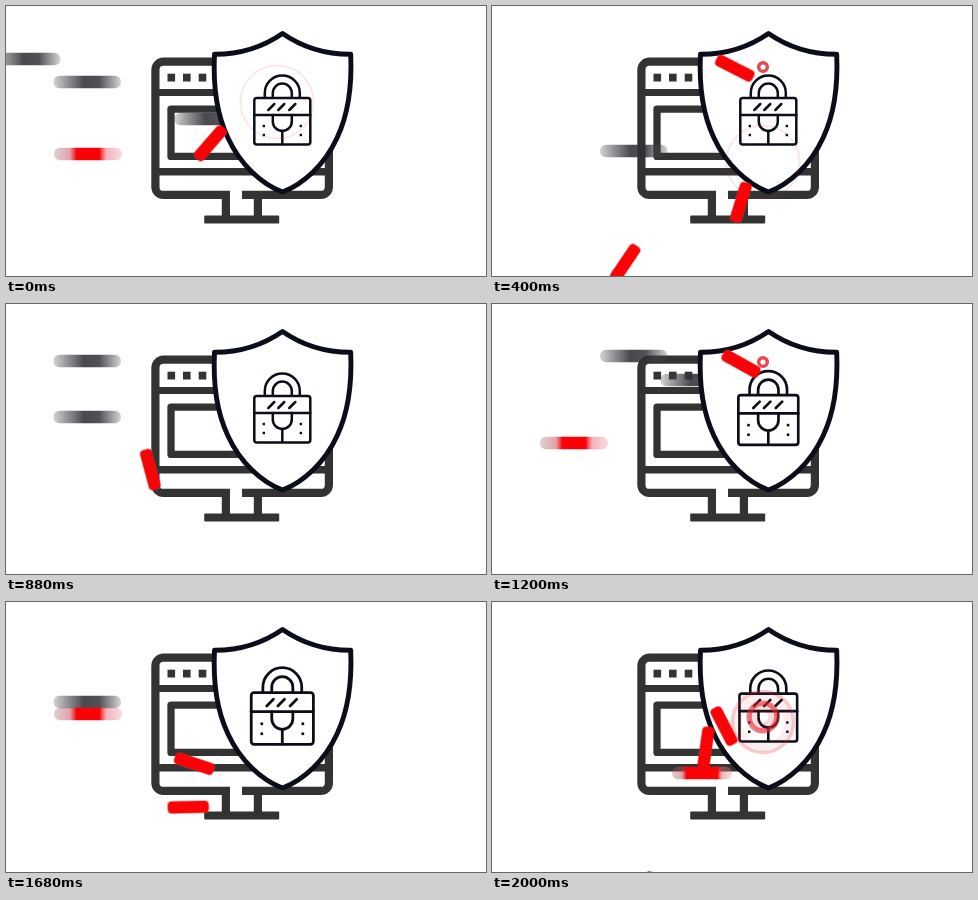
Write an HTML page with a canvas that moves like this. It is 480 by 270 pixels and loops after 2040 ms.

```html
<!DOCTYPE html>
<html lang="en">
<head>
<meta charset="utf-8">
<title>Shielded computer</title>
<style>
html, body { margin: 0; width: 100%; height: 100%; overflow: hidden; background: #fff; }
canvas { display: block; width: 480px; height: 270px; }
</style>
</head>
<body>
<canvas id="stage" width="480" height="270"></canvas>
<script>
const ctx = document.getElementById('stage').getContext('2d');
const STEP = 40, STEPS = 51;
const GREY = '#333334', INK = '#0b0e19', RED = '#fa0306';

// Grey beams: [step of entry, height]
const beams = [
  [-3, 113], [-1, 76], [0, 53], [4, 100], [8, 145], [13, 76], [17, 130],
  [21, 57], [21, 113], [24, 88], [27, 76], [28, 52], [33, 60],
  [37, 88], [38, 114], [41, 100], [44, 113], [46, 146]
];

// Red attacks: beam height, step of impact, then the path of the tumbling rod
const attacks = [
  { hit: -7, lane: 88,  x: 254, y: 103, vx: -7.1, vy: 2,   turn: 10, spin: 17.3 },
  { hit: 3,  lane: 148, x: 258, y: 155, vx: -1.3, vy: 3,   turn: 7,  spin: 14.3 },
  { hit: 9,  lane: 53,  x: 251, y: 59,  vx: -8.2, vy: 2.8, turn: 8,  spin: 19 },
  { hit: 29, lane: 50,  x: 254, y: 56,  vx: -5.05, vy: 3.45, turn: 15, spin: 14.1, g: 0.72 },
  { hit: 33, lane: 139, x: 252, y: 149, vx: -7.75, vy: 2.5, turn: 7, spin: 19.1 },
  { hit: 45, lane: 112, x: 252, y: 116, vx: -7.6, vy: 3.8, turn: 7,  spin: 18.2, lead: 1 },
  { hit: 47, lane: 107, x: 253, y: 112, vx: -7,   vy: 2.8, turn: 10, spin: 17.6 },
  { hit: 51, lane: 171, x: 254, y: 172, vx: -7,   vy: 3,   turn: 10, spin: 17.6 }
];

function pill(x, y, w, h, r, fill) {
  ctx.beginPath();
  ctx.roundRect(x, y, w, h, r);
  ctx.fillStyle = fill;
  ctx.fill();
}

function box(x, y, w, h, r, width, color) {
  ctx.beginPath();
  ctx.roundRect(x, y, w, h, r);
  ctx.lineWidth = width;
  ctx.strokeStyle = color;
  ctx.stroke();
}

function line(...p) {
  ctx.beginPath();
  for (let i = 0; i < p.length; i += 2) ctx.lineTo(p[i], p[i + 1]);
  ctx.stroke();
}

function circle(x, y, r, width, alpha) {
  ctx.beginPath();
  ctx.arc(x, y, Math.max(1, r), 0, 2 * Math.PI);
  ctx.lineWidth = width;
  ctx.strokeStyle = `rgba(225,35,45,${alpha})`;
  ctx.stroke();
}

function blend(x, w, stops) {
  const g = ctx.createLinearGradient(x, 0, x + w, 0);
  for (const [at, color] of stops) g.addColorStop(at, color);
  return g;
}

function greyBeam(x, y) {
  pill(x, y - 6.3, 67.5, 12.6, 6, blend(x, 67.5, [
    [0, 'rgba(70,70,78,.24)'], [0.2, 'rgba(65,65,72,.56)'],
    [0.45, 'rgba(48,48,53,.88)'], [0.68, 'rgba(48,48,53,.84)'],
    [0.85, 'rgba(65,65,72,.54)'], [1, 'rgba(70,70,78,.22)']
  ]));
}

// edge: share of the width that fades out at either end
function redBeam(x, y, w, edge) {
  pill(x, y - 6.3, w, 12.6, 6, blend(x, w, [
    [0, 'rgba(150,100,110,.3)'], [edge * 0.7, 'rgba(200,70,80,.5)'],
    [edge, RED], [1 - edge, RED],
    [1 - edge * 0.7, 'rgba(235,100,110,.5)'], [1, 'rgba(225,140,155,.3)']
  ]));
}

function monitor() {
  box(149.4, 55.7, 173.5, 133.2, 8, 8.2, GREY);
  ctx.fillStyle = '#fff';
  ctx.fillRect(224, 184, 12, 10);
  ctx.fillStyle = GREY;
  ctx.fillRect(150, 83, 173, 7);
  ctx.fillRect(150, 162, 173, 7.5);
  for (const x of [161.5, 177, 192.7]) ctx.fillRect(x, 67.7, 7.6, 7.8);
  box(165, 103.1, 142, 47.3, 0, 7.3, GREY);
  ctx.fillRect(215.8, 189, 8.2, 22);
  ctx.fillRect(247.8, 189, 8.2, 22);
  pill(198.2, 209.4, 75, 8, 1, GREY);
}

function shield() {
  ctx.beginPath();
  ctx.moveTo(276.5, 27.4);
  ctx.bezierCurveTo(258, 40.2, 235, 48.3, 208.5, 48.2);
  ctx.bezierCurveTo(207, 78, 210, 107, 222, 132);
  ctx.bezierCurveTo(234, 158, 255, 178, 276.5, 186);
  ctx.bezierCurveTo(298, 178, 319, 158, 331, 132);
  ctx.bezierCurveTo(343, 107, 346, 78, 344.7, 48.2);
  ctx.bezierCurveTo(318, 48.3, 295, 40.2, 276.5, 27.4);
  ctx.closePath();
  ctx.fillStyle = '#fff';
  ctx.fill();
  ctx.lineWidth = 4.9;
  ctx.lineJoin = 'round';
  ctx.strokeStyle = INK;
  ctx.stroke();
}

function arch(r) {
  ctx.beginPath();
  ctx.moveTo(-r, -13);
  ctx.lineTo(-r, -17);
  ctx.arc(0, -17, r, Math.PI, 0);
  ctx.lineTo(r, -13);
  ctx.stroke();
}

function lock(scale) {
  ctx.save();
  ctx.translate(276.3, 104);
  ctx.scale(scale, scale);
  box(-28, -12, 56, 46.5, 2.5, 2.5, INK);
  ctx.lineCap = 'round';
  arch(17.5);
  arch(9.5);
  line(-28, 5, 28, 5);
  for (const x of [-14, -4, 7]) line(x, 0, x + 6, -6);
  ctx.beginPath();
  ctx.moveTo(-9.5, 5);
  ctx.lineTo(-9.5, 11.5);
  ctx.arc(0, 11.5, 9.5, Math.PI, 0, true);
  ctx.lineTo(9.5, 5);
  ctx.stroke();
  line(0, 21, 0, 34);
  ctx.fillStyle = INK;
  for (const x of [-18.5, 18.5])
    for (const y of [16, 25]) ctx.fillRect(x - 1.2, y - 1.2, 2.4, 2.4);
  ctx.restore();
}

// Shock ring with a pale inner glow, thinning as it spreads
function ring(lane, age) {
  if (age <= 0 || age >= 8) return;
  const y = lane + 8, r = 5.25 * age;
  const swell = Math.max(0, Math.sin(Math.PI * age / 7));
  const w = 2 + 3.4 * swell;
  if (age > 2) circle(271, y, r - 6, 9, 0.16 * swell);
  circle(271, y, r - w / 2 + 0.8, w, 0.95 - age * 0.12);
}

function rod(a, age) {
  ctx.save();
  ctx.translate(a.x + a.vx * age, a.y + a.vy * age + (a.g || 0.83) * age * age / 2);
  ctx.rotate((a.turn + a.spin * age) * Math.PI / 180);
  pill(-21.3, -6.6, 42.6, 13.2, 4.5, 'rgba(205,50,60,.5)');
  pill(-20.2, -5.8, 40.4, 11.6, 4, RED);
  ctx.restore();
}

function draw(n) {
  ctx.fillStyle = '#fff';
  ctx.fillRect(0, 0, 480, 270);
  monitor();
  for (const [start, y] of beams) {
    const k = n - start;
    if (k >= 0 && k < 5) greyBeam(-13 + 60.5 * k, y);
  }
  shield();
  lock(1 + 0.15 * Math.max(0, 1 - Math.abs(n - 38) / 15));
  for (const a of attacks) {
    const age = n - a.hit;
    if (age >= 0) ring(a.lane, age + (a.lead || 0));
  }
  for (const a of attacks) {
    const age = n - a.hit;
    if (age >= 0) rod(a, age);
    else if (age === -1) redBeam(180, a.lane, 60, 0.24);
    else if (age >= -4) redBeam(48 + 60.5 * (age + 3), a.lane, 68, 0.33);
  }
}

const began = performance.now();
function tick() {
  draw(Math.floor((performance.now() - began) / STEP) % STEPS);
  requestAnimationFrame(tick);
}
tick();
</script>
</body>
</html>
```
